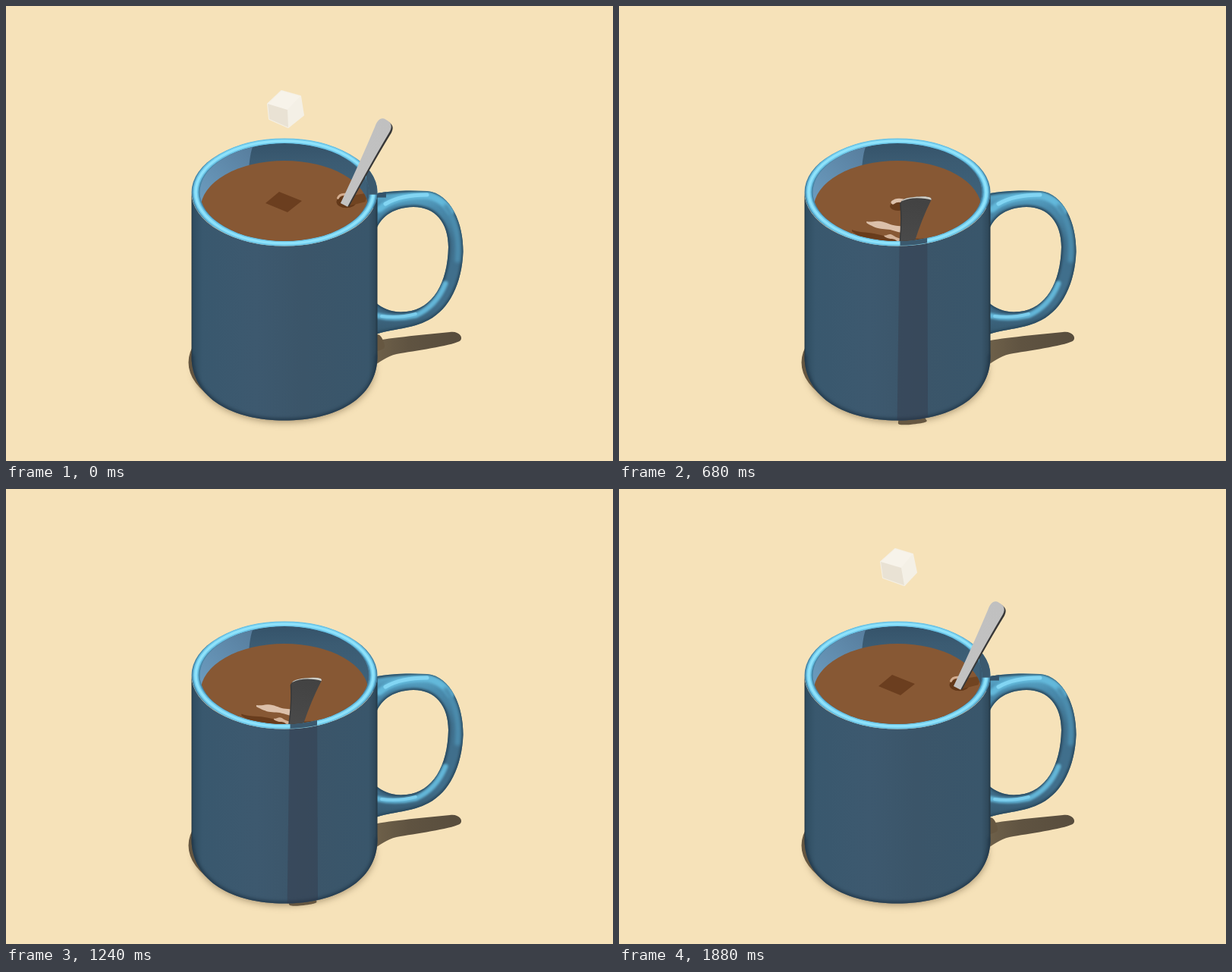
Animation, 800 px wide and 600 px high, one loop 1.92 s. Source, as an HTML page with a canvas:

```html
<!DOCTYPE html>
<html lang="en">
<head>
<meta charset="utf-8">
<title>Stirred mug</title>
<style>
html, body { margin: 0; width: 100%; height: 100%; overflow: hidden; background: #f6e2b9; }
canvas { display: block; }
</style>
</head>
<body>
<canvas id="stage" width="800" height="600"></canvas>
<script>
const ctx = document.getElementById('stage').getContext('2d');
const LOOP = 1920, STEP = 40, STIR = 1600, CX = 367;
const { PI, sin, cos, abs, exp, hypot } = Math;
const clamp = (v, a = 0, b = 1) => Math.min(b, Math.max(a, v));
const mix = (a, b, k) => a + (b - a) * k;
const grey = v => `rgb(${v},${v},${v})`;

function ellipse(x, y, rx, ry) {
  const p = new Path2D();
  p.ellipse(x, y, rx, ry, 0, 0, 2 * PI);
  return p;
}

function poly(points) {
  const p = new Path2D();
  points.forEach(([x, y]) => p.lineTo(x, y));
  p.closePath();
  return p;
}

function fill(path, style, rule = 'nonzero') {
  ctx.fillStyle = style;
  ctx.fill(path, rule);
}

function stroke(path, style, width, blur = 0) {
  ctx.filter = blur ? `blur(${blur}px)` : 'none';
  ctx.strokeStyle = style;
  ctx.lineWidth = width;
  ctx.lineCap = 'round';
  ctx.stroke(path);
  ctx.filter = 'none';
}

function clipped(path, draw, rule = 'nonzero') {
  ctx.save();
  ctx.clip(path, rule);
  draw();
  ctx.restore();
}

function gradient(x0, y0, x1, y1, ...stops) {
  const g = ctx.createLinearGradient(x0, y0, x1, y1);
  stops.forEach(([at, color]) => g.addColorStop(at, color));
  return g;
}

// Fixed shapes
const rim = ellipse(CX, 245.5, 122.5, 70.5);
const mouth = ellipse(CX, 245.5, 111.5, 64.5);
const coffee = ellipse(CX, 267, 110.5, 63);
const body = new Path2D('M244.500 246V462C244.500 518 300 546.500 367 546.500C434 546.500 489.500 518 489.500 462V246A122.5 70.5 0 0 1 244.500 246Z');
const handle = new Path2D(
  'M484 248C510 243 530 243 555 244C587 247 603 288 602.500 324C601 366 584 400 557 414C535 426 510 425 484 434Z' +
  'M487 297C493 280 507 266 537 265C566 265 583 286 583 318C582 365 563 399 528 403C510 405 498 400 487 391Z');
const handleShadow = new Path2D('M480 443C500 438 545 434 585 430C596 428 603 436 599 441C592 447 545 454 520 458C505 460 498 466 484 475Z');
const wallLight = new Path2D('M240 270L255 180H328Q322 188 320 215Z');
const overRim = new Path2D();
overRim.rect(0, 0, 800, 245);
overRim.addPath(mouth);
const shell = new Path2D();
shell.addPath(rim);
shell.addPath(mouth);

// Spoon pose: two turns with a sinusoidal ease, leaning out while stirring
function spoonAt(t) {
  const u = clamp(t / STIR);
  const swing = Math.sqrt(sin(PI * u));
  const turn = -11 + 8 * sin(PI * u) ** 2 - 360 * (1 - cos(PI * u));
  const a = turn * PI / 180;
  const lean = 0.87 + 0.13 * swing;
  const brake = exp(-(((t - 1480) / 90) ** 2));
  const s = abs(sin(a));
  return {
    a,
    speed: sin(PI * u),
    tip: [CX + 158 * lean * cos(a), 165 + 88 * lean * sin(a)],
    base: [CX + 80 * cos(a) - 13 * brake, 278 + 35 * sin(a) - 9 * (1 - swing) + 13 * brake],
    tipHalf: 8 + 12 * s,
    baseHalf: 5 + 1.5 * s + 3 * clamp(sin(a))
  };
}

// The blade's cross axis turns from the screen normal to the stirring tangent
function spoonPath(s, [bx, by] = s.base, [tx, ty] = s.tip) {
  const { a, baseHalf: wb, tipHalf: wt } = s;
  const dx = tx - bx, dy = ty - by, len = hypot(dx, dy) || 1;
  const flip = sin(a) > 0 ? -1 : 1, k = sin(a) ** 2;
  const nx = mix(-dy / len, -sin(a) * flip, k);
  const ny = mix(dx / len, 0.58 * cos(a) * flip, k);
  const at = (p, w) => [bx + dx * p + nx * w, by + dy * p + ny * w];
  const p = new Path2D();
  p.moveTo(...at(0, -wb));
  p.quadraticCurveTo(...at(0.5, -mix(wb, wt, 0.32)), ...at(0.88, -wt));
  p.bezierCurveTo(...at(0.96, -wt * 1.1), ...at(1, -wt * 0.85), ...at(1, -wt * 0.2));
  p.bezierCurveTo(...at(1, wt * 0.85), ...at(0.96, wt * 1.1), ...at(0.88, wt));
  p.quadraticCurveTo(...at(0.5, mix(wb, wt, 0.32)), ...at(0, wb));
  p.closePath();
  return p;
}

function drawGround(s) {
  fill(new Path2D('M0 0H800V600H0Z'), '#f6e2b9');
  ctx.filter = 'blur(5px)';
  fill(ellipse(CX, 479, 119, 70), 'rgba(95,75,45,.5)');
  ctx.filter = 'none';
  fill(ellipse(364, 470, 123.5, 70), '#655640');
  fill(handleShadow, gradient(485, 0, 600, 0, [0, '#6f614a'], [0.4, '#5f5341'], [1, '#584d3d']));
  const [bx, by] = s.base, [tx, ty] = s.tip;
  fill(spoonPath(s, [bx - 3, by + 205], [tx - 5, ty + 292 + 8 * sin(s.a)]), '#665741');
}

function drawHandle(s) {
  fill(handle, gradient(0, 243, 0, 432,
    [0, '#5fb2d4'], [0.12, '#4a8cae'], [0.35, '#3f6f8c'], [0.8, '#416f8c'], [1, '#36596f']), 'evenodd');
  clipped(handle, () => {
    stroke(handle, '#2b4b60', 5, 1.5);
    stroke(new Path2D('M492 268Q513 249 556 250Q574 253 586 271'), '#63b8da', 9, 1.5);
    stroke(new Path2D('M500 261Q520 249 555 249'), '#82d5f3', 5, 0.7);
    stroke(new Path2D('M580 265Q599 292 595 335'), '#4c8dae', 7, 2);
    stroke(new Path2D('M488 408Q512 414 540 408Q567 396 579 366'), '#63b6d8', 7, 1.5);
    stroke(new Path2D('M495 409Q518 412 540 406'), '#7bcdec', 4, 0.7);
    const [tx, ty] = s.tip;
    if (cos(s.a) > 0.3) {
      const drop = (ty - 150) * 4;
      ctx.fillStyle = '#35536a';
      for (const y of [251, 391]) ctx.fillRect(480, y - 80 + drop, tx - 481, 80);
    }
  }, 'evenodd');
}

function drawMug(s) {
  fill(body, gradient(244, 0, 490, 0,
    [0, '#1d303d'], [0.012, '#304e62'], [0.06, '#39586e'], [0.35, '#3d596f'], [0.6, '#3b5569'], [0.95, '#39566b'], [0.985, '#304a5c'], [1, '#1f323f']));
  clipped(body, () => {
    stroke(new Path2D('M244.500 462C244.500 518 300 546.500 367 546.500C434 546.500 489.500 518 489.500 462'), '#22384a', 5, 2);
  });
  fill(rim, gradient(245, 0, 489, 0, [0, '#4788aa'], [0.5, '#56a2c4'], [1, '#4788aa']));
  stroke(ellipse(CX, 245.5, 117, 67.5), '#6cc5e7', 7, 0.7);
  stroke(ellipse(CX, 245.5, 117, 67.5), '#8ee2fb', 3.5, 0.7);
}

// Tapered wave trailing the spoon
function wake(s, from, to, lift, width, color) {
  const upper = [], lower = [];
  for (let i = 0; i <= 24; i++) {
    const u = i / 24, a = s.a + mix(from, to, u) * PI / 180;
    const half = width * sin(PI * mix(0.06, 0.96, u)) ** 0.6 * (0.9 + 0.2 * sin(u * 11));
    const x = CX + 80 * cos(a), y = 278 + 35 * sin(a) - lift - 6 * u + sin(u * 8);
    upper.push([x, y - half]);
    lower.unshift([x, y + half]);
  }
  fill(poly(upper.concat(lower)), color);
}

function drawCoffee(t, s) {
  const cross = mix(s.base[0], s.tip[0], 0.65);
  fill(mouth, gradient(0, 181, 0, 260, [0, '#35536a'], [0.3, '#3b5b72'], [1, '#3f637b']));
  fill(wallLight, gradient(255, 250, 325, 185, [0, '#6a9abd'], [1, '#577d9d']));
  if (sin(s.a) < 0.1) {
    const w = 5 + 9 * abs(sin(s.a));
    ctx.fillStyle = '#3a596f';
    ctx.fillRect(cross - w, 170, 2 * w, 95);
  }
  fill(coffee, '#875834');
  clipped(coffee, () => {
    const [bx, by] = s.base;
    const k = clamp(s.speed * 1.5);
    if (k > 0.4) {
      wake(s, -22, 58 * k, 0, 5.5 * k, '#683c1c');
      wake(s, -4, 40 * k, 18, 5 * k, '#dcc0aa');
      wake(s, 4, 22 * k, 4, 3 * k, '#d3b298');
    } else {
      fill(ellipse(bx + 3, by - 4, 13, 8), '#633819');
      fill(poly([[bx + 8, by - 12], [bx + 32, by - 16], [bx + 28, by - 4], [bx + 8, by + 1]]), '#714421');
      stroke(new Path2D(`M${bx - 8} ${by - 9}q2 -6 11 -5`), '#d3ad90', 3);
      if (t > 1400 && t < 1580) {
        stroke(new Path2D(`M${bx - 7} ${by + 6}q-10 -22 5 -32`), '#683c1c', 5);
        stroke(new Path2D(`M${bx - 7} ${by - 26}q7 -7 18 -2`), '#d8b499', 4);
      }
    }
    drawSplash(t);
  });
}

function drawSplash(t) {
  if (t > 120 && t < 360) {
    const u = (t - 120) / 240;
    ctx.globalAlpha = 1 - u;
    stroke(ellipse(CX, 259, 18 + 48 * u, 9 + 27 * u), '#683c1c', 6 - 4 * u);
    stroke(ellipse(CX, 256, 14 + 46 * u, 7 + 25 * u), '#c99f82', 3 - 2 * u);
    ctx.globalAlpha = 1;
  }
  if (t >= 360 && t <= 440) {
    stroke(new Path2D('M357 272q4 -2 7 0M372 273q3 1 6 0'), '#6d4020', 1.5);
  }
  if (t >= 600 && t <= 720) {
    fill(ellipse(368, 264, 11, 6), '#683c1c');
    stroke(new Path2D('M361 259q6 -5 17 -1'), '#dcc0aa', 5);
  }
}

function drawDrop(t) {
  if (t < 240 || t > 440) return;
  const y = 228 + 22 * ((t - 310) / 90) ** 2;
  fill(ellipse(369, y, 9, 9), '#693d1d');
  fill(ellipse(369, y - 1, 7, 6.5), '#8a5a36');
  fill(ellipse(370, y - 4, 4, 2.5), '#dcc0aa');
}

function drawWallShadow(s) {
  const x = mix(s.base[0], s.tip[0], 0.65), w = 5 + 13 * abs(sin(s.a));
  if (sin(s.a) > -0.03) {
    clipped(body, () => {
      fill(poly([[x - w, 245], [x + w, 245], [x + w + 1, 560], [x - w - 4, 560]]), 'rgba(52,54,68,.38)');
    });
  }
  clipped(shell, () => {
    ctx.fillStyle = '#3b596e';
    ctx.fillRect(x - w, 228 + 70 * sin(s.a), 2 * w, 34);
  }, 'evenodd');
}

function drawSpoon(s) {
  const [bx, by] = s.base, [tx, ty] = s.tip, h = s.tipHalf;
  const dark = clamp((sin(s.a) - 0.25) * 2.5);
  const lit = clamp(-cos(s.a) * 2.4) * (1 - dark);
  const shape = spoonPath(s);
  const side = cos(s.a) > 0.5 ? 2 : -1.5;
  clipped(overRim, () => {
    fill(spoonPath(s, [bx + side, by], [tx + side, ty + 2]), '#383838');
    const top = Math.round(mix(192, 66, dark)), low = Math.round(mix(194, 74, dark));
    fill(shape, gradient(tx, ty, bx, by, [0, grey(top)], [1, grey(low)]));
    clipped(shape, () => {
      if (lit > 0) {
        ctx.globalAlpha = lit;
        fill(shape, '#d2d2d2');
        fill(poly([[tx - h * 1.3, ty - 6], [tx + h * 1.3, ty - 8], [tx + h * 1.1, ty + 26],
          [mix(tx, bx, 0.55) + 6, mix(ty, by, 0.55)], [mix(tx, bx, 0.3), mix(ty, by, 0.3)],
          [tx - h * 0.2, ty + 14], [tx - h * 1.3, ty + 10]]), '#f1f1f1');
        ctx.globalAlpha = 1;
      }
      const edge = cos(s.a) > 0.6
        ? new Path2D(`M${tx + 6} ${ty + 1}q6 4 4 14`)
        : new Path2D(`M${tx - h} ${ty + 4}Q${tx - h * 0.6} ${ty} ${tx} ${ty}T${tx + h} ${ty + 3}`);
      stroke(edge, dark > 0.5 ? '#d0cec6' : '#eeeeee', 3);
    });
  });
}

function drawCubeShadow(t) {
  if (t >= 1720 || t < 140) {
    fill(poly([[342, 260], [360, 245], [390, 257], [371, 272]]), '#6b3e1f');
  }
}

// The cube enters above the stage, then drops through the loop seam into the cup
function drawCube(t) {
  const time = t > 960 ? t - LOOP : t;
  if (time < -240 || time > 170) return;
  const f = time / STEP;
  const y = 136 + 33.8 * f + 0.75 * f * f;
  const k = clamp(f, -5, 5);
  const corners = [[-5 - k, -24], [20 + k, -17], [24, 8 + k], [4 - 4 * k, 24], [-21 - k, 13 - k], [-23, -7]]
    .map(([x, dy]) => [368 + x, y + dy]);
  const [a, b, c, d, e, g] = corners;
  const mid = [371 - k, y + 1];
  const above = new Path2D();
  above.rect(0, -60, 800, 322);
  clipped(above, () => {
    const outline = poly(corners);
    ctx.lineJoin = 'round';
    fill(outline, '#f5f0e5');
    stroke(outline, '#f5f0e5', 2);
    fill(poly([a, b, mid, g]), '#f7f3ea');
    fill(poly([b, c, d, mid]), '#f4f0e6');
    fill(poly([g, mid, d, e]), '#e9e2d4');
  });
}

function render(t) {
  const s = spoonAt(t);
  drawGround(s);
  drawHandle(s);
  drawMug(s);
  clipped(mouth, () => {
    drawCoffee(t, s);
    drawCubeShadow(t);
  });
  drawWallShadow(s);
  const far = sin(s.a) < 0;
  if (far) drawSpoon(s);
  drawCube(t);
  drawDrop(t);
  if (!far) drawSpoon(s);
}

const start = performance.now();
function tick(now) {
  const t = Math.max(0, now - start) % LOOP;
  render(Math.floor(t / STEP) * STEP);
  requestAnimationFrame(tick);
}
render(0);
requestAnimationFrame(tick);
</script>
</body>
</html>
```
